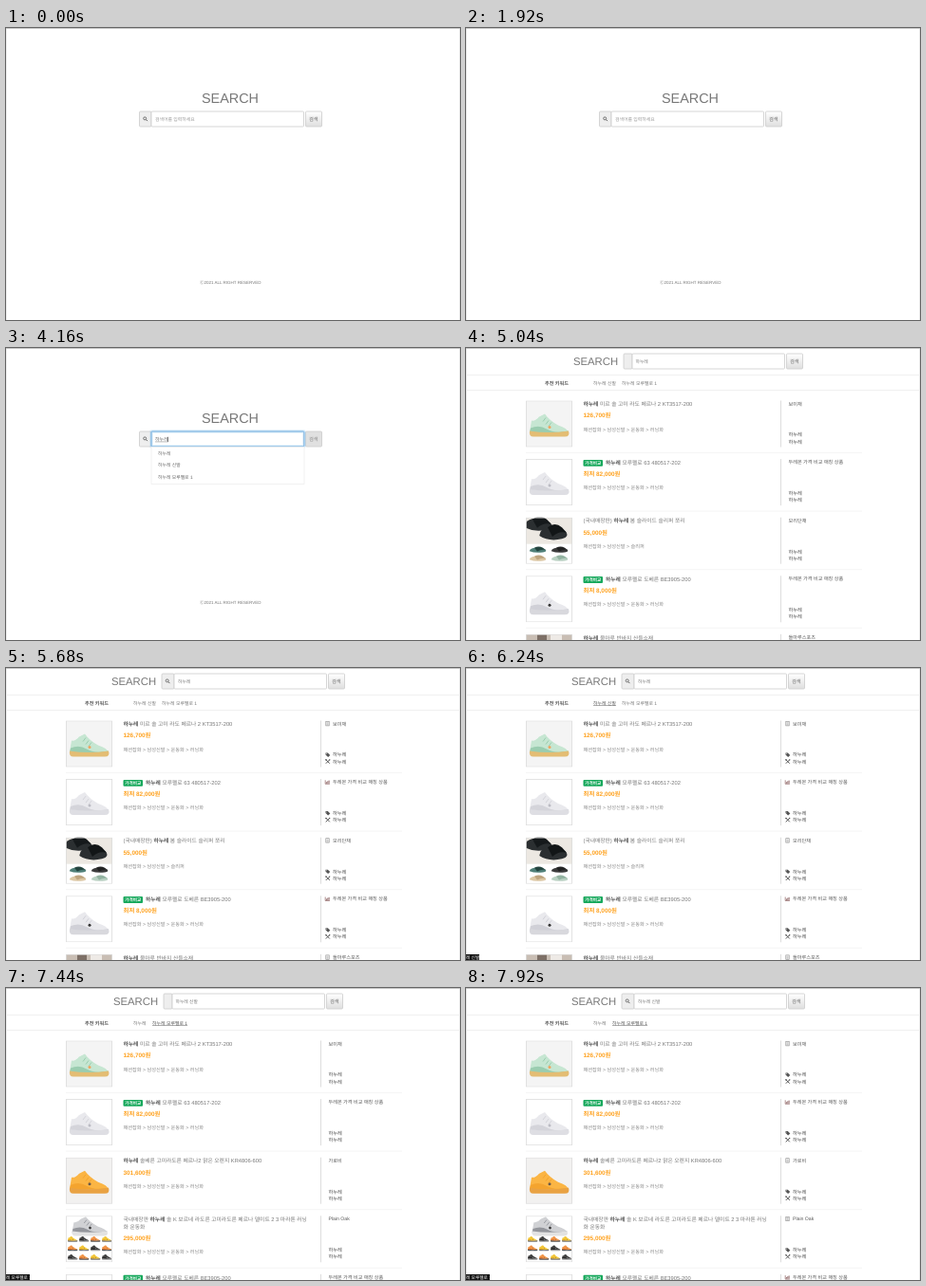
An HTML page for the animation above (8000 ms loop, 478x308 px).

```html
<!DOCTYPE html>
<html lang="ko">
<head>
<meta charset="utf-8">
<title>Search</title>
<style>
html, body { margin: 0; width: 100%; height: 100%; overflow: hidden; background: #fff; }
svg { display: block; }
text { font-family: "Liberation Sans", "Noto Sans CJK KR", sans-serif; text-rendering: geometricPrecision; }
</style>
</head>
<body>
<svg id="stage" width="478" height="308" viewBox="0 0 478 308"></svg>
<script>
const LOOP = 8000;
const BRAND = '하누레', SHOES = BRAND + ' 신발', MODEL = BRAND + ' 모루펠로 1';
const RUNNING = '패션잡화 &gt; 남성신발 &gt; 운동화 &gt; 러닝화';
const COMPARE = '두레몬 가격 비교 매칭 상품';
const TYPING = [[2400, 'ㅎ'], [2520, '하'], [2640, '한'], [2760, '하누'], [2900, '하눌'], [3070, BRAND]];

// y is the visual middle of the line
const text = (x, y, size, str, fill = '#777', extra = '') =>
  `<text x="${x}" y="${y + size * .37}" font-size="${size}" fill="${fill}" ${extra}>${str}</text>`;
const rect = (x, y, w, h, fill, extra = '') =>
  `<rect x="${x}" y="${y}" width="${w}" height="${h}" fill="${fill}" ${extra}/>`;
const path = (d, fill, extra = '') => `<path d="${d}" fill="${fill}" ${extra}/>`;
const line = (d, color, width = 1) => path(d, 'none', `stroke="${color}" stroke-width="${width}"`);
const dot = (x, y, r, fill) => `<circle cx="${x}" cy="${y}" r="${r}" fill="${fill}"/>`;
const at = (x, y, body, scale = '1') => `<g transform="translate(${x} ${y}) scale(${scale})">${body}</g>`;

const DEFS = `<defs><linearGradient id="btn" x2="0" y2="1">
  <stop stop-color="#fff"/><stop offset="1" stop-color="#dfdfdf"/></linearGradient></defs>`;
const frame = rect(0, 0, 478, 308, '#fff') +
  line('M.5 0V308M477.5 0V308', '#eee') + line('M0 .5H478', '#c8c8c8');

const lens = (x, y) => `<circle cx="${x - .6}" cy="${y - .6}" r="1.5" fill="none" stroke="#555" stroke-width=".8"/>` +
  line(`M${x + .5} ${y + .5}l1.6 1.6`, '#555', 1);

function searchBox(x, y, addon, icon, hover) {
  const edge = 'stroke="#ccc" stroke-width=".8"', end = x + addon + 161;
  return rect(x, y, addon, 16, '#eee', edge + ' rx="1"') +
    rect(x + addon, y, 160.5, 16, '#fff', edge + ' rx="1"') +
    rect(end + 1.5, y, 17, 16, hover ? '#e0e0e0' : 'url(#btn)', edge + ' rx="1"') +
    text(end + 5, y + 8, 5.3, '검색', hover ? '#888' : '#666') +
    (icon ? lens(x + 6.3, y + 8) : '');
}

// Product pictures, each on a 49 by 49 tile
function shoe(upper, shade, sole, mark) {
  return path('M4 33 6 21Q10 22 14 17L20 14Q25 21 34 26 44 29 45 34Z', upper) +
    path('M5 29Q14 25 22 30T45 32L44 34H4Z', shade) +
    line('M21 18l-3 4M24 21l-3 4M27 23l-3 4', shade, 1) +
    path('M4 32Q24 35 45 32 47 38 41 38H8Q3 38 4 32Z', sole) +
    dot(25, 28, 1.5, mark);
}
const slipper = (a, b) => path('M1 13Q2 5 10 4L23 9Q27 14 20 16 9 19 1 13Z', a) +
  path('M8 5Q14-1 20 5L24 10Q17 8 12 14Z', b);
const border = rect(.4, .4, 48.2, 48.2, 'none', 'stroke="#ddd" stroke-width=".8"');

const photos = {
  mint: rect(0, 0, 49, 49, '#f4f4f4') + shoe('#c6e6d2', '#9acdb0', '#e3bd74', '#f2a35e'),
  white: shoe('#e9e9ed', '#d4d4da', '#dedee3', '#bcbcc4'),
  slides: rect(0, 0, 49, 28, '#ece8e2') + at(-3, -3, slipper('#2b2f31', '#15191b'), '1.25 1') +
    at(13, 5, slipper('#2b2f31', '#121617'), '1.25 1.1') +
    [['#4f7f78', '#24443f'], ['#3b3b3b', '#222'], ['#dcc7a4', '#bfa680'], ['#b9d0c2', '#93b3a1']]
      .map((c, i) => at(3 + i % 2 * 23, 30 + (i >> 1) * 9, slipper(...c), '.75 .42')).join(''),
  grey: at(0, 3, shoe('#e9e9ed', '#d0d0d7', '#d8d8dd', '#333')),
  brown: rect(0, 0, 49, 49, '#c9beb4') + rect(12, 0, 10, 49, '#7d6f66') + rect(26, 0, 12, 49, '#eeeae6'),
  orange: rect(0, 0, 49, 49, '#f2f1f0') + shoe('#fbb544', '#f4a42f', '#e9a243', '#6b5a4c'),
  sheet: at(3, -11, shoe('#d0d1d4', '#94969c', '#e2e2e2', '#333'), '.9 .85') +
    Array.from({ length: 12 }, (_, i) => at(1 + i % 4 * 12, 18 + (i >> 2) * 9.5,
      shoe(...[['#f3c83a', '#e0a624', '#777', '#333'], ['#444', '#222', '#999', '#eee'],
        ['#f2974a', '#d9722e', '#555', '#333']][(i + (i >> 2)) % 3]), '.25')).join('')
};

// Small symbols, centred on the origin
const icons = {
  note: rect(-1.7, -2.2, 3.4, 4.4, '#fff', 'stroke="#888" stroke-width=".6"') + line('M-1-.9H1M-1 .2H1M-1 1.2H1', '#888', .5),
  chart: line('M-2.3-2V2H2.4', '#744', .6) + line('M-1 1.4V0M.3 1.4V-1M1.6 1.4V-1.7', '#744', .8),
  tag: path('M-2.3-2H0L2.5 .4 .3 2.4-2.3 0Z', '#555') + dot(-1.3, -1, .45, '#fff'),
  tools: line('M-2-2 2 2M2-2-2 2', '#555', 1) + dot(-1.8, -1.8, .8, '#555') + dot(1.8, -1.8, .7, '#555')
};

const bold = str => str.replace(BRAND, `<tspan font-weight="700" fill="#555">${BRAND}</tspan>`);

const row1 = { photo: 'mint', title: [BRAND + ' 미르 솔 고미 라도 페르나 2 KT3517-200'], price: '126,700원', shop: '보미채' };
const row2 = { photo: 'white', title: [BRAND + ' 모루펠로 63 480517-202'], price: '최저 82,000원' };
const axis = { photo: 'grey', title: [BRAND + ' 모루펠로 도베른 BE3905-200'], price: '최저 8,000원' };
const lists = {
  [BRAND]: [row1, row2,
    { photo: 'slides', title: [`(국내매장판) ${BRAND} 봄 슬라이드 슬리퍼 쪼리`], price: '55,000원', shop: '모리단채', kind: '패션잡화 &gt; 남성신발 &gt; 슬리퍼' },
    axis,
    { photo: 'brown', title: [BRAND + ' 물마루 반바지 산들소재'], price: '', shop: '들마루스포츠' }],
  [SHOES]: [row1, row2,
    { photo: 'orange', title: [BRAND + ' 솔베른 고미라도른 페르나2 맑은 오렌지 KR4806-600'], price: '301,600원', shop: '가로비' },
    { photo: 'sheet', title: [`국내매장판 ${BRAND} 솔 K 보르네 라도른 고미라도른 페르나 델미트 2 3 마라톤 러닝`, '화 운동화'], price: '295,000원', shop: 'Plain Oak' },
    axis]
};

function product(item, i, ready) {
  const y = 55.5 + i * 61.6, down = (item.title.length - 1) * 8, shopX = ready ? 344 : 339.5;
  const badge = item.shop ? '' : rect(123.5, y + .8, 20.5, 6.8, '#16a85b', 'rx="1"') +
    text(125.3, y + 4.1, 4.6, '가격비교', '#fff', 'font-weight="700"');
  const marks = ready ? at(338.5, y + 3.2, icons[item.shop ? 'note' : 'chart']) +
    at(338.8, y + 36, icons.tag) + at(338.8, y + 43.2, icons.tools) : '';
  return at(63, y, `<svg width="49" height="49">${rect(0, 0, 49, 49, '#fff')}${photos[item.photo]}${border}</svg>`) +
    badge + item.title.map((s, n) => text(badge ? 147 : 123.5, y + 3.6 + n * 8, 5.75, bold(s), '#777')).join('') +
    text(123.5, y + 15.5 + down, 6.4, item.price, '#ffa21f', 'font-weight="700"') +
    text(123.5, y + 30.2 + down, 5.2, item.kind || RUNNING, '#888') +
    line(`M331.5 ${y}v49`, '#d5d5d5', .8) + line(`M63 ${y + 55}H417`, '#f3f3f3', .8) +
    text(shopX, y + 3.2, 5.15, item.shop || COMPARE, '#555', 'font-weight="500"') +
    text(shopX, y + 36, 5.2, BRAND, '#444', 'font-weight="500"') +
    text(shopX, y + 43.2, 5.2, BRAND, '#444', 'font-weight="500"') + marks;
}

function results(query, links, ready, hovered) {
  const shift = ready ? 0 : 2;
  return text(111 + shift, 13.8, 11.3, 'SEARCH') +
    searchBox(164 + shift, 6, ready ? 13 : 9, ready) +
    text(ready ? 181 : 178.5, 14, 4.8, query, '#777') +
    line('M0 28.5H478M0 44.5H478', '#f0f0f0') +
    text(83, 36.7, 5.1, '추천 키워드', '#555', 'font-weight="700"') +
    links.map(([x, s]) => text(x, 36.7, 4.92, s, s === hovered ? '#555' : '#777',
      s === hovered ? 'text-decoration="underline"' : '')).join('') +
    lists[query].map((item, i) => product(item, i, ready)).join('') +
    (hovered ? rect(0, 302, hovered === SHOES ? 14 : 25, 6, '#111') +
      text(0, 305, 4.7, hovered.slice(2), '#fff') : '');
}

function home(t) {
  const focus = Math.round(Math.min(1, Math.max(0, (t - 2000) / 150)) * 20) / 20;
  const typed = TYPING.reduce((s, [start, str]) => t >= start ? str : s, '');
  const caret = t >= 2000 && t < 4400 && !(t >= 3600 && t < 4130);
  const end = 157 + typed.length * 4.6;
  let out = text(206, 74, 14.4, 'SEARCH') + searchBox(140.5, 88, 12.5, true, t >= 4080);
  if (focus) out += `<g opacity="${focus}">` + [[4, .15], [2.4, .25], [.9, .9]].map(([w, o]) =>
    rect(153, 88, 161, 16, 'none', `rx="1" stroke="#79b8ec" stroke-width="${w}" stroke-opacity="${o}"`)).join('') + '</g>';
  out += typed ? text(157, 96.2, 5, typed, '#666') : text(157, 96.2, 4.9, '검색어를 입력하세요', '#999');
  if (typed && t < 4400) out += line(`M157 98.9H${end}`, '#777', .5);
  if (caret) out += line(`M${end - .3} 93.8v5.2`, '#444', .6);
  if (t >= 2640) out += rect(153, 104.5, 161, 39, '#fff', 'stroke="#eee" stroke-width=".8"') +
    [BRAND, SHOES, MODEL].map((s, i) => text(160, 110.8 + i * 12.8, 4.85, s, '#666')).join('');
  return out + text(204, 268.3, 4.5, 'Ⓒ2021 ALL RIGHT RESERVED');
}

function draw(t) {
  if (t < 4720) return home(t);
  if (t < 7440) return results(BRAND, [[134, SHOES], [164, MODEL]], t >= 5200, t >= 6000 ? SHOES : '');
  return results(SHOES, [[134, BRAND], [154, MODEL]], t >= 7600, MODEL);
}

const stage = document.getElementById('stage');
const begin = performance.now();
let shown = '';
function tick() {
  const next = draw((performance.now() - begin) % LOOP);
  if (next !== shown) stage.innerHTML = DEFS + frame + (shown = next);
  requestAnimationFrame(tick);
}
tick();
</script>
</body>
</html>
```
